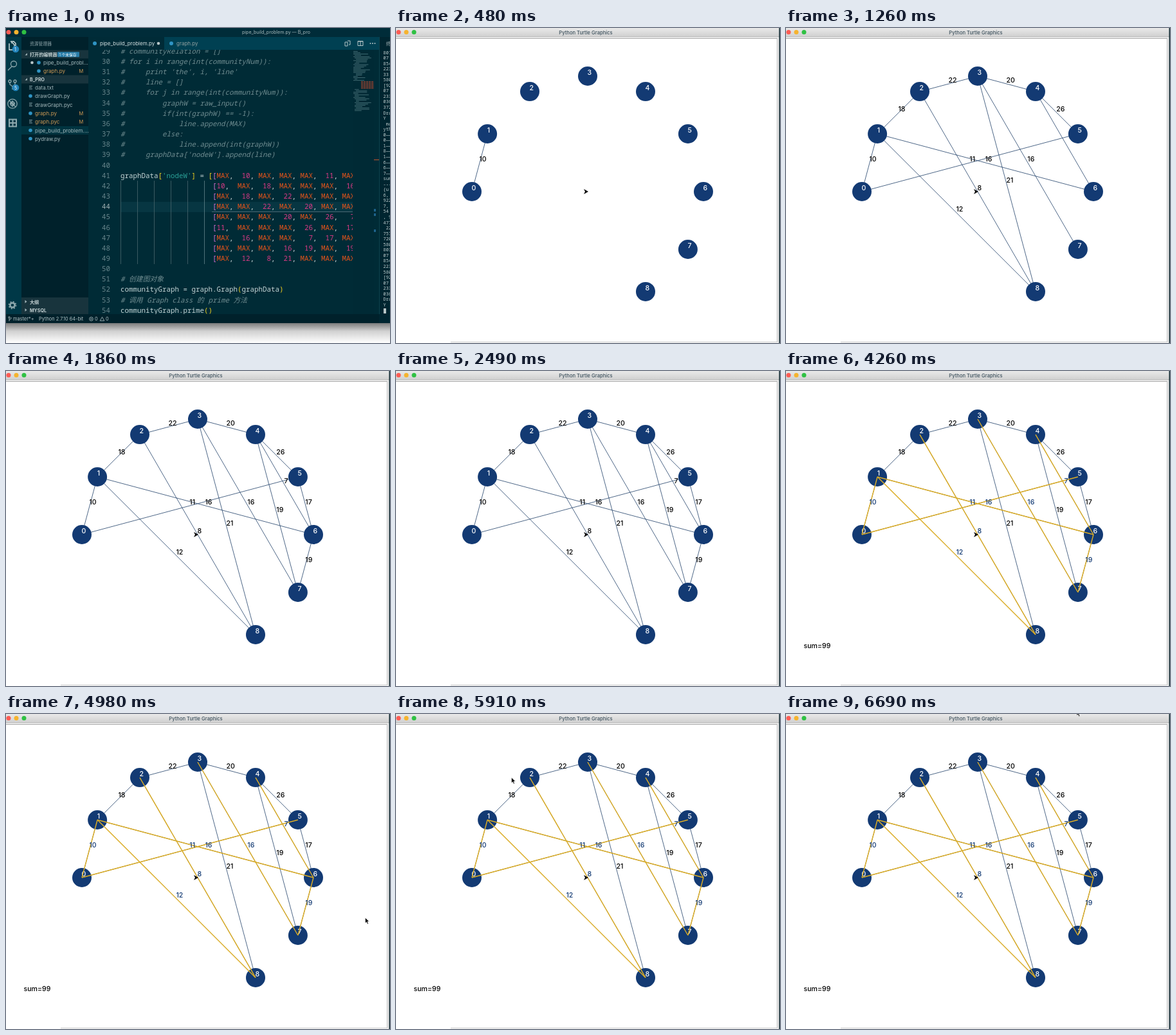
These frames come from a looping animation (597x491 px, 6.72 s). An HTML page:

```html
<!DOCTYPE html>
<html lang="zh">
<head>
<meta charset="utf-8">
<title>Python Turtle Graphics</title>
<style>
  html, body { margin: 0; width: 100%; height: 100%; overflow: hidden; background: #fff; }
  svg { display: block; width: 597px; height: 491px; }
  text { white-space: pre; font-family: Inter, "Noto Sans CJK SC", "Noto Sans CJK", sans-serif; }
  .code { font: 500 10.83px "Noto Sans Mono", "Noto Sans CJK SC", "Noto Sans CJK", monospace; }
  .term { font: 7px "Noto Sans Mono", monospace; }
  .note { font-style: italic; font-weight: 400; }
  .num { font-size: 10.6px; font-weight: 500; }
  .icon { fill: none; stroke: #8fa9ae; stroke-width: 1.3; }
</style>
</head>
<body>
<svg id="stage" viewBox="0 0 597 491"></svg>
<script>
const LOOP = 6720, STEP = 30;
const WINDOW_AT = 150, NODE_AT = 180, EDGE_AT = 435, TREE_AT = 2550, SUM_AT = 3450;
const NAVY = '#133a73', SLATE = '#2f4c72', GOLD = '#deae24', BLUE = '#2f94c4';

const edges = [
  [0, 1, 10], [0, 5, 11], [1, 2, 18], [1, 6, 16], [1, 8, 12],
  [2, 3, 22], [2, 8, 8], [3, 4, 20], [3, 7, 16], [3, 8, 21],
  [4, 5, 26], [4, 6, 7], [4, 7, 19], [5, 6, 17], [6, 7, 19]
];
// Edge indices in the order Prim's method picks them.
const tree = [0, 1, 4, 6, 3, 11, 14, 8];

const rect = (x, y, w, h, fill, extra = '') =>
  `<rect x="${x}" y="${y}" width="${w}" height="${h}" fill="${fill}" ${extra}/>`;
const dot = (x, y, r, fill, extra = '') =>
  `<circle cx="${x}" cy="${y}" r="${r}" fill="${fill}" ${extra}/>`;
const line = (x1, y1, x2, y2, color, w = 1, extra = '') =>
  `<line x1="${x1}" y1="${y1}" x2="${x2}" y2="${y2}" stroke="${color}" stroke-width="${w}" ${extra}/>`;
const text = (x, y, s, fill, size = 8, extra = '') =>
  `<text x="${x}" y="${y}" fill="${fill}" style="font-size:${size}px" ${extra}>${s}</text>`;
const path = (d, extra = 'class="icon"') => `<path d="${d}" ${extra}/>`;
const lights = () =>
  dot(4, 6.5, 3.5, '#fc5b54') + dot(16, 6.5, 3.5, '#f5b32f') + dot(28, 6.5, 3.5, '#2fc143');

function random(seed) {
  return () => (seed = (seed * 16807) % 2147483647) / 2147483647;
}

// Code area
const matrix = Array.from({ length: 9 }, () => Array(9).fill('MAX'));
for (const [a, b, w] of edges) matrix[a][b] = matrix[b][a] = String(w);

function matrixRow(row, i) {
  const cells = row.slice(0, 7).map((c, k) => k ? c.padStart(3) : c);
  const first = cells[0] + ',' + ' '.repeat(4 - cells[0].length);
  const head = i ? ' '.repeat(22) : "graphData['nodeW'] = [";
  return head + '[' + first + cells.slice(1).join(', ') + ',';
}

const codeLines = [
  '# communityRelation = []',
  '# for i in range(int(communityNum)):',
  "#     print 'the', i, 'line'",
  '#     line = []',
  '#     for j in range(int(communityNum)):',
  '#         graphW = raw_input()',
  '#         if(int(graphW) == -1):',
  '#             line.append(MAX)',
  '#         else:',
  '#             line.append(int(graphW))',
  "#     graphData['nodeW'].append(line)",
  '',
  ...matrix.map(matrixRow),
  '',
  '# 创建图对象',
  'communityGraph = graph.Graph(graphData)',
  '# 调用 Graph class 的 prime 方法',
  'communityGraph.prime()'
];

function paint(s) {
  let depth = 0;
  return s.replace(/'\w+'|MAX|\b\d+\b|[[\]()]/g, m => {
    let color = '#d93a86';
    if (m[0] === "'") color = '#2aa198';
    else if (m === 'MAX') color = '#e0531b';
    else if (/[[\]()]/.test(m)) {
      const inner = m === '[' && (s[0] === ' ' || depth > 2);
      color = inner ? '#d86fd2' : '#f2d21f';
      depth++;
    }
    return `<tspan fill="${color}">${m}</tspan>`;
  });
}

function codeArea() {
  let out = rect(178, 271, 361, 16, '#073642') + line(320, 286.5, 539, 286.5, '#5d7480', .8);
  for (let x = 178.5; x < 310; x += 26) out += line(x, 238, x, 368, x > 300 ? '#62868c' : '#4a666c', .8);
  codeLines.forEach((s, i) => {
    const y = 39.8 + i * 16.16, note = s[0] === '#';
    out += `<text class="code" x="162" y="${y}" text-anchor="end" fill="${i === 15 ? '#a3b4b5' : '#68868c'}">${29 + i}</text>`;
    out += `<text class="code ${note ? 'note' : ''}" x="178" y="${y}" fill="${note ? '#708d91' : '#c3d3d4'}">${note ? s : paint(s)}</text>`;
  });
  return `<g clip-path="url(#codeClip)">${out}</g>`;
}

function minimap() {
  const rnd = random(77);
  let out = rect(539, 34, 33, 412, '#002a35');
  for (let i = 0; i < 46; i++) {
    const y = 36 + i * 2.05, red = i > 22 && i < 29;
    const x = red ? 552 : 540 + Math.floor(rnd() * 3) * 2;
    out += rect(x, y, red ? 20 : 4 + rnd() * 22, 1, red ? '#b4472f' : '#527a80',
      red ? '' : 'opacity=".8"');
    if (red) for (let k = 0; k < 5; k++) out += rect(555 + k * 4, y, 1, 1, '#002a35');
  }
  return out + rect(572, 205, 8, 1, '#c5562c') +
    [282, 289, 314].map(y => rect(572, y, 3, 4, '#1d638b')).join('');
}

function sidebar() {
  const pale = '#a4b8bb', amber = '#cf9a55';
  const file = (x, y, name, kind, color = pale) =>
    (kind === 'py' ? dot(x - 7, y - 3, 2.8, BLUE)
      : path(`M${x - 9} ${y - 5.5}h5M${x - 9} ${y - 3.3}h4M${x - 9} ${y - 1}h5`, 'stroke="#8fa9ae" stroke-width=".9"')) +
    text(x, y, name, color, 8.1) +
    (color === amber ? text(113.5, y, 'M', amber, 7.4) : '');
  const arrow = (x, y, open) => path(open ? `M${x} ${y + 1.5}h3.5v-3.5z` : `M${x} ${y - 2.5}l3 2.5l-3 2.5z`, 'fill="#a4b8bb"');
  const header = (y, name, open) => rect(24, y - 6.5, 104, 13, '#18343d') +
    arrow(29.5, y, open) + text(37, y + 3, name, '#c2d0d2', 7.1, 'font-weight="700"');
  return rect(24, 14, 104, 432, '#00212b') +
    text(37, 27, '资源管理器', '#8da3a8', 6.8) +
    header(41, '打开的编辑器', true) +
    rect(80, 37.2, 34, 8, '#287da9', 'rx="1"') + text(82.5, 43.5, '1 个未保存', '#fff', 5.8) +
    dot(40.5, 54, 2.3, '#b7c6c8') + file(58, 57, 'pipe_build_probl…', 'py') +
    file(58, 70, 'graph.py', 'py', amber) +
    header(80, 'B_PRO', true) +
    rect(24, 153, 104, 13, '#003440') +
    file(45, 96, 'data.txt', 'txt') + file(45, 109, 'drawGraph.py', 'py') +
    file(45, 122.5, 'drawGraph.pyc', 'txt') + file(45, 136, 'graph.py', 'py', amber) +
    file(45, 149, 'graph.pyc', 'txt', amber) + file(45, 162.5, 'pipe_build_problem.…', 'py') +
    file(45, 175.5, 'pydraw.py', 'py') +
    header(426.5, '大纲', false) + header(439.5, 'MYSQL', false);
}

function activityBar() {
  const badge = (x, y, n) => dot(x, y, 5.3, '#2385bd') + text(x - 2, y + 2.5, n, '#fff', 7);
  return rect(0, 14, 24, 432, '#003847') +
    path('M5 24v10h8v-8l-3-3h-2M7 21h5l3 3v7', 'fill="none" stroke="#dce5e6" stroke-width="1.4"') + badge(15, 33, '1') +
    dot(12, 56, 4.5, 'none', 'class="icon"') + path('M9 60l-6 6') +
    dot(6, 83, 2, 'none', 'class="icon"') + dot(14, 83, 2, 'none', 'class="icon"') +
    path('M6 85v3l4 3v5M14 85v3l-4 3') + badge(15, 93, '5') +
    dot(10, 118, 7.2, 'none', 'class="icon"') + dot(10, 118, 3, 'none', 'class="icon"') + path('M5 113l10 10M6 118h8M10 113v10') +
    path('M5 142.5h11v11h-11zM10.5 142.5v11M5 148h11', 'fill="none" stroke="#8fa9ae" stroke-width="2"') +
    dot(10, 432, 3.6, 'none', 'stroke="#8fa9ae" stroke-width="2.5"') +
    dot(10, 432, 5.5, 'none', 'stroke="#8fa9ae" stroke-width="1.6" stroke-dasharray="2.1 2.22"');
}

function terminal() {
  const words = ('801|07|854|223|33|580|[92|07|233|036|372|Dra|Y| ma|yth|0——|0——|1——|8——|1——|6——|6——|7——|sum|---|{u|6,|922|7,|' +
    '54|, 9|477| 22|757|720|580|803|07|854|223|580|[92|07|233|036|Dra|Y').split('|');
  return rect(580, 14, 17, 446, '#002530') + line(580.5, 14, 580.5, 446, '#0d424e') +
    text(591, 27, '终', '#a9b9bb', 7) +
    words.map((s, i) => `<text class="term" x="586.5" y="${40.5 + i * 8.55}" fill="#bdcbcc">${s}</text>`).join('') +
    rect(587, 437, 4, 8, '#b8c5c6');
}

function editor() {
  const pale = '#b6c5c7';
  return rect(0, 460, 597, 31, 'url(#shadow)') +
    rect(0, 0, 597, 460, '#002b36') + rect(0, 0, 597, 14, '#002c39') + lights() +
    text(420, 9.3, 'pipe_build_problem.py — B_pro', '#a9b9bb', 7.1, 'text-anchor="middle"') +
    codeArea() +
    rect(128, 14, 452, 20, '#004052') + rect(128, 14, 117, 20, '#002b37') + line(245.5, 14, 245.5, 34, '#002b37') +
    dot(138, 24, 3, BLUE) + text(146, 27, 'pipe_build_problem.py', '#d5dfe0', 8) + dot(237, 24, 2.3, pale) +
    dot(257, 24, 3, BLUE) + text(265, 27, 'graph.py', '#93a1a1', 8) +
    path('M527 22h4v6h-4zM531 20h4v6h-2', `fill="none" stroke="${pale}"`) +
    path('M547 20.5h8v7h-8zM551 20v8M547 21h8', `fill="none" stroke="${pale}"`) +
    [566.5, 570, 573.5].map(x => dot(x, 24, 1, pale)).join('') +
    minimap() + activityBar() + sidebar() + terminal() +
    rect(0, 446, 580, 14, '#00212b') +
    dot(5, 451, 1.2, 'none', `stroke="${pale}" stroke-width=".8"`) + path('M5 452v5M8 451v2l-3 2', `fill="none" stroke="${pale}" stroke-width=".8"`) +
    text(11, 456, 'master*+', pale, 7.4) + text(51, 456, 'Python 2.7.10 64-bit', pale, 7.4) +
    dot(132.5, 453.5, 2.9, 'none', `stroke="${pale}" stroke-width=".8"`) + path('M131 452l3 3m0-3l-3 3', `stroke="${pale}" stroke-width=".7"`) +
    text(138, 456, '0', pale, 7.4) + path('M149.5 450.5l3.3 5.8h-6.6z', `fill="none" stroke="${pale}" stroke-width=".8"`) + text(155, 456, '0', pale, 7.4);
}

// Drawing window
const nodes = Array.from({ length: 9 }, (_, i) => {
  const a = Math.PI * (1 - i / 6);
  return [298 + 180 * Math.cos(a), 255 - 180 * Math.sin(a)];
});
const timed = (at, body, to = LOOP) => `<g data-at="${at}" data-to="${to}">${body}</g>`;
const number = (x, y, s, fill) => `<text class="num" x="${x}" y="${y}" fill="${fill}">${s}</text>`;
const treeTime = i => tree.includes(i) ? TREE_AT + tree.indexOf(i) * 110 : LOOP;

function edgeLine([a, b], color, w) {
  return line(...nodes[a], ...nodes[b], color, w);
}
function edgeLabel([a, b, w], color) {
  const [x, y] = [0, 1].map(k => (nodes[a][k] + nodes[b][k]) / 2);
  return number(x - .6, y - 2, w, color);
}

function turtleWindow() {
  let out = rect(0, 0, 597, 491, '#fff') + rect(0, 0, 596, 14, 'url(#bar)') +
    line(0, 13.5, 596, 13.5, '#b5b5b5') + line(0, 16, 593, 16, '#8c8c8c') + lights() +
    text(295, 9.6, 'Python Turtle Graphics', '#3c505c', 7.6, 'text-anchor="middle" font-weight="500"') +
    rect(592, 16, 1, 473, '#c4c4c4') + rect(593, 14, 3, 477, '#ececec') + rect(595.5, 0, 1.5, 491, '#172f37') +
    line(85, 489.5, 593, 489.5, '#c9c9c9');
  edges.forEach((e, i) => out += timed(EDGE_AT + i * 75, edgeLine(e, SLATE, .85)));
  nodes.forEach(([x, y], i) => out += timed(NODE_AT + i * 26,
    dot(x, y, 15, NAVY) + number(x - .4, y - 2, i, '#fff')));
  edges.forEach((e, i) => out += timed(EDGE_AT + 30 + i * 75, edgeLabel(e, '#000'), treeTime(i)));
  tree.forEach(i => out += timed(treeTime(i), edgeLine(edges[i], GOLD, 1.4)));
  tree.forEach(i => out += timed(treeTime(i), edgeLabel(edges[i], NAVY)));
  return out + path('M299 255l-7-4l2 4l-2 4z', 'fill="#000"') +
    timed(SUM_AT, number(27.5, 432, 'sum=99', '#000'));
}

const stage = document.getElementById('stage');
stage.innerHTML = `<defs>
  <linearGradient id="bar" x2="0" y2="1"><stop stop-color="#e9e9e9"/><stop offset="1" stop-color="#cfcfcf"/></linearGradient>
  <linearGradient id="shadow" x2="0" y2="1"><stop stop-color="#7c7c7c"/><stop offset=".4" stop-color="#d0d0d0"/><stop offset="1" stop-color="#fff"/></linearGradient>
  <clipPath id="codeClip"><rect x="128" y="34" width="411" height="412"/></clipPath>
  </defs>${editor()}${timed(WINDOW_AT, turtleWindow())}
  <path id="pointer" d="M0 0v8.5l2-1.8l1.4 3.2l1.5-.7l-1.4-3.1h2.7z" fill="#000" stroke="#fff" stroke-width=".6"/>`;

// Pointer stops: time, x, y
const track = [
  [4830, 597, 338], [4980, 558.5, 317.5], [5450, 370, 215],
  [5910, 179.5, 99], [6150, 200, 82], [6690, 452, -6], [6720, 458, -9]
];
const pointer = document.getElementById('pointer');
const parts = [...stage.querySelectorAll('[data-at]')].map(el => ({ el, at: +el.dataset.at, to: +el.dataset.to }));

function movePointer(t) {
  const i = track.findIndex(([time]) => time > t);
  pointer.style.display = i > 0 ? '' : 'none';
  if (i < 1) return;
  const [a, b] = [track[i - 1], track[i]];
  const p = (t - a[0]) / (b[0] - a[0]), at = k => a[k] + (b[k] - a[k]) * p;
  pointer.setAttribute('transform', `translate(${at(1)} ${at(2)})`);
}

function render(now) {
  const t = Math.floor((Math.max(0, now - start) % LOOP) / STEP) * STEP;
  for (const { el, at, to } of parts) el.style.display = t >= at && t < to ? '' : 'none';
  movePointer(t);
}

const start = performance.now();
function tick() {
  render(performance.now());
  requestAnimationFrame(tick);
}
tick();
</script>
</body>
</html>
```
